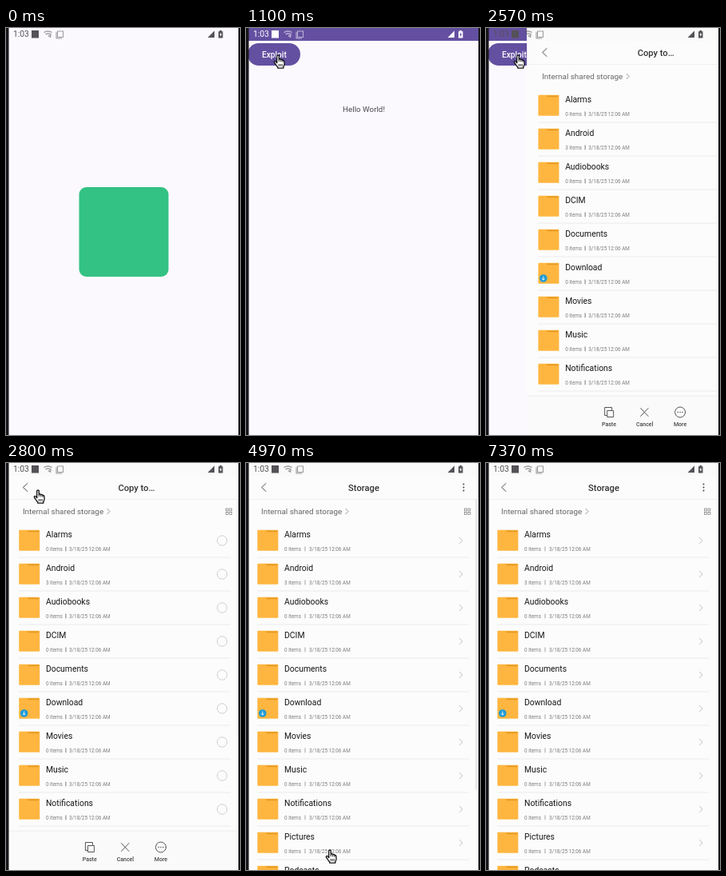
An HTML page for the animation above (7.4 s loop, 293 by 509 pixels).

```html
<!DOCTYPE html>
<html lang="en">
<head>
<meta charset="utf-8">
<title>File copy demo</title>
<style>
  html, body { margin: 0; width: 100%; height: 100%; overflow: hidden; background: #fcfcfc; }
  svg { display: block; width: 100%; height: 100%; font-family: Roboto, "Noto Sans", sans-serif; }
  .line { fill: none; stroke: #555; stroke-linecap: round; stroke-linejoin: round; }
  .title { font-size: 11.2px; font-weight: 500; fill: #333; text-anchor: middle; }
  .name { font-size: 10.4px; fill: #161616; }
  .info { font-size: 6.35px; fill: #7c7c7c; }
  .label { font-size: 7px; font-weight: 500; fill: #444; text-anchor: middle; }
</style>
</head>
<body>
<svg viewBox="0 0 293 509" preserveAspectRatio="none">
  <defs>
    <g id="folder">
      <path d="M0 1Q0 0 1 0H25Q26 0 26 1V25Q26 26 25 26H1Q0 26 0 25Z" fill="#ffb640"/>
      <path d="M10 .8H25V2.6H12Z" fill="#e59a22"/>
    </g>
  </defs>

  <g id="app">
    <rect width="293" height="509" fill="#fcf9fe"/>
    <rect width="293" height="16" fill="#6450a1"/>
    <rect x="2" y="19" width="66" height="28" rx="14" fill="#6450a1"/>
    <text x="20" y="37" font-size="10.1" font-weight="500" fill="#fff">Exploit</text>
    <text x="147.5" y="104.5" font-size="9.8" fill="#4c494f" text-anchor="middle">Hello World!</text>
  </g>

  <g id="splash">
    <rect width="293" height="509" fill="#fcf9fe"/>
    <rect id="icon" x="91.5" y="199" width="112" height="112" rx="9" fill="#33c283"/>
  </g>

  <g id="files">
    <rect width="293" height="509" fill="#fcfcfc"/>
    <rect width="293" height="16" fill="#fafafa"/>
    <g id="head"></g>
    <g id="rows"></g>
    <g id="picker">
      <text class="title" x="161.5" y="34.5">Copy to…</text>
      <g id="radios"></g>
    </g>
    <g id="browser">
      <text class="title" x="147.5" y="34.5">Storage</text>
      <g fill="#444">
        <circle cx="272.5" cy="26.5" r="1"/><circle cx="272.5" cy="30.5" r="1"/><circle cx="272.5" cy="34.5" r="1"/>
      </g>
      <g id="arrows"></g>
    </g>
    <rect id="scroll" x="287" y="45" width="3" rx="1.5" fill="#e9e9e9"/>
    <g id="bar">
      <rect y="460" width="293" height="50" fill="#fafafa"/>
      <path d="M0 460H293" stroke="#eee"/>
      <g class="line">
        <path d="M100.5 484.5H97.5V474.5H106.5V477.5M101 478.5H108.5V486.5H101Z"/>
        <path d="M142.5 475.5L152 485.5M152 475.5L142.5 485.5"/>
        <circle cx="192" cy="480.5" r="6.5"/>
      </g>
      <g fill="#555">
        <circle cx="189.2" cy="480.5" r=".8"/><circle cx="192" cy="480.5" r=".8"/><circle cx="194.8" cy="480.5" r=".8"/>
      </g>
      <text class="label" x="102.8" y="498">Paste</text>
      <text class="label" x="147.5" y="498">Cancel</text>
      <text class="label" x="192" y="498">More</text>
    </g>
  </g>

  <g id="status">
    <text x="9" y="11.4" font-size="10.3">1:03</text>
    <rect x="32" y="3" width="9" height="9.5"/>
    <g opacity=".55" fill="none" stroke="currentColor">
      <path d="M47.5 5.6Q52.5 2.6 57.5 5.6M49.5 8Q52.5 6 56 8L55.5 11L53 9.5" stroke-width="1.5"/>
      <path d="M64.5 4H71.5V11.5H64.5ZM63 5V13H70" stroke-width="1.1"/>
    </g>
    <path d="M252.5 12L261 3.5V12Z"/>
    <path d="M266 4.2H267.5V3H270V4.2H271.5V12.5H266Z"/>
    <path id="bolt" d="M269.2 5.5L267.3 8.8H268.5V11L270.3 7.8H269.2Z"/>
  </g>

  <g id="cursor" stroke="#111" stroke-width="1.3" stroke-linejoin="round">
    <path fill="#fff" d="M-1.3 1.2Q-1.3 0 0 0Q1.3 0 1.3 1.2V5.6Q1.5 4.6 2.6 4.8Q3.7 5 3.7 6Q4 5.2 5 5.5Q6 5.7 6 6.8Q6.5 6.2 7.3 6.6Q8 7 8 8.5V11Q8 13 6.8 14.5V16.2H-.2V15Q-2 13-3 11.2L-4.6 9Q-5 8-4.2 7.5Q-3.2 7.2-2.3 8.3L-1.3 9.5Z"/>
    <path fill="none" stroke-width=".9" d="M1.3 5.6V8.2M3.7 6V8.4M6 6.8V8.8M-1.3 8V10M1.2 11V13.8M3.2 11V13.8M5.2 11V13.8"/>
  </g>

  <path d="M0 0H3.5V509H0ZM291 0H293V509H291Z" fill="#17161a"/>
</svg>

<script>
const LOOP = 7400, PITCH = 42;
const OPEN = 2450, PASTE = 4430;
const $ = id => document.getElementById(id);
const folders = ["Alarms", "Android", "Audiobooks", "DCIM", "Documents", "Download",
  "Movies", "Music", "Notifications", "Pictures", "Podcasts"];

const chevron = (x, y, w, h) =>
  `<path class="line" d="M${x} ${y - h}L${x + w} ${y}L${x} ${y + h}"/>`;

$("head").innerHTML =
  chevron(25, 30.5, -5.5, 5) +
  `<path d="M0 45.5H293" stroke="#f0f0f0"/>
   <text x="19" y="64" font-size="9.9" fill="#666">Internal shared storage</text>
   <g opacity=".6">${chevron(125, 60.5, 3, 3.2)}</g>` +
  [273.5, 278].map(x => [57, 61.5].map(y =>
    `<rect x="${x}" y="${y}" width="2.8" height="2.8" fill="none" stroke="#888" stroke-width=".8"/>`).join("")).join("");

const badge = y =>
  `<circle cx="20.7" cy="${y}" r="4.8" fill="#1f9ad6"/>
   <path d="M20.7 ${y - 2.4}V${y + 2}M18.9 ${y + .4}L20.7 ${y + 2.2}L22.5 ${y + .4}" fill="none" stroke="#fff" stroke-width=".9"/>`;

$("rows").innerHTML = folders.map((name, i) => {
  const y = 97 + i * PITCH;
  return `<use href="#folder" x="14.3" y="${y - 13.3}"/>
    ${name === "Download" ? badge(y + 6) : ""}
    <text class="name" x="48" y="${y - 4}">${name}</text>
    <text class="info" x="48" y="${y + 12.9}">${name === "Android" ? 3 : 0} items</text>
    <text class="info date" x="79" y="${y + 12.9}">3/18/25 12:06 AM</text>
    <path class="sep" d="M74 ${y + 7.5}V${y + 13.3}" stroke="#999" stroke-width=".9"/>
    <path d="M14 ${y + 21}H279.5" stroke="#ebebeb"/>`;
}).join("");
const dates = document.querySelectorAll(".date");
const seps = document.querySelectorAll(".sep");

$("radios").innerHTML = folders.map((_, i) =>
  `<circle cx="268.7" cy="${97 + i * PITCH}" r="6.2" fill="none" stroke="#cfcfcf"/>`).join("");
$("arrows").innerHTML = `<g opacity=".35">` + folders.map((_, i) =>
  chevron(267.3, 97 + i * PITCH, 3.8, 3.8)).join("") + `</g>`;

const clamp = v => Math.max(0, Math.min(1, v));
const ramp = (t, from, to) => clamp((t - from) / (to - from));
const smooth = k => k * k * (3 - 2 * k);

// Pointer stops: time, x, y of the fingertip
const path = [
  [560, 130, 520], [800, 62, 66], [1020, 40, 34], [2960, 40, 34], [3380, 66, 210],
  [3800, 105, 484], [5950, 105, 484], [6250, 118, 512]
];

function pointer(t) {
  const n = path.findIndex(p => p[0] > t);
  if (n < 1) return null;
  const a = path[n - 1], b = path[n], k = smooth(ramp(t, a[0], b[0]));
  return [a[1] + (b[1] - a[1]) * k, a[2] + (b[2] - a[2]) * k];
}

const show = (id, on) => { $(id).style.display = on ? "" : "none"; };
const move = (id, x, y) => $(id).setAttribute("transform", `translate(${x} ${y})`);

function draw(t) {
  const fade = 1 - ramp(t, 180, 440);
  show("splash", fade > 0);
  $("splash").setAttribute("opacity", fade);
  $("icon").setAttribute("opacity", 1 - ramp(t, 180, 360));

  const open = t >= OPEN, pasted = t >= PASTE;
  const slide = open ? 288 * Math.exp((OPEN - t) / 70) : 293;
  show("files", open);
  move("files", slide < .5 ? 0 : slide, 0);

  show("picker", !pasted);
  show("browser", pasted);
  const drop = smooth(ramp(t, PASTE, PASTE + 200));
  show("bar", drop < 1);
  move("bar", 0, 50 * drop);
  dates.forEach(d => d.setAttribute("x", pasted ? 79 : 77));
  seps.forEach(s => {
    s.setAttribute("transform", pasted ? "" : "translate(-1 0)");
    s.setAttribute("stroke", pasted ? "#999" : "#666");
  });
  $("scroll").setAttribute("height", pasted ? 364 : 296);
  $("scroll").setAttribute("opacity", 1 - ramp(t, 6500, 6800));

  const light = t >= 500 && t < OPEN + 100;
  const ink = light ? "#fff" : "#545257";
  $("status").setAttribute("fill", ink);
  $("status").setAttribute("color", ink);
  $("bolt").setAttribute("fill", light ? "#6450a1" : "#f7f7f7");

  const p = pointer(t);
  show("cursor", p);
  if (p) move("cursor", p[0], p[1]);
}

const start = performance.now();
function tick() {
  draw((performance.now() - start) % LOOP);
  requestAnimationFrame(tick);
}
tick();
</script>
</body>
</html>
```
